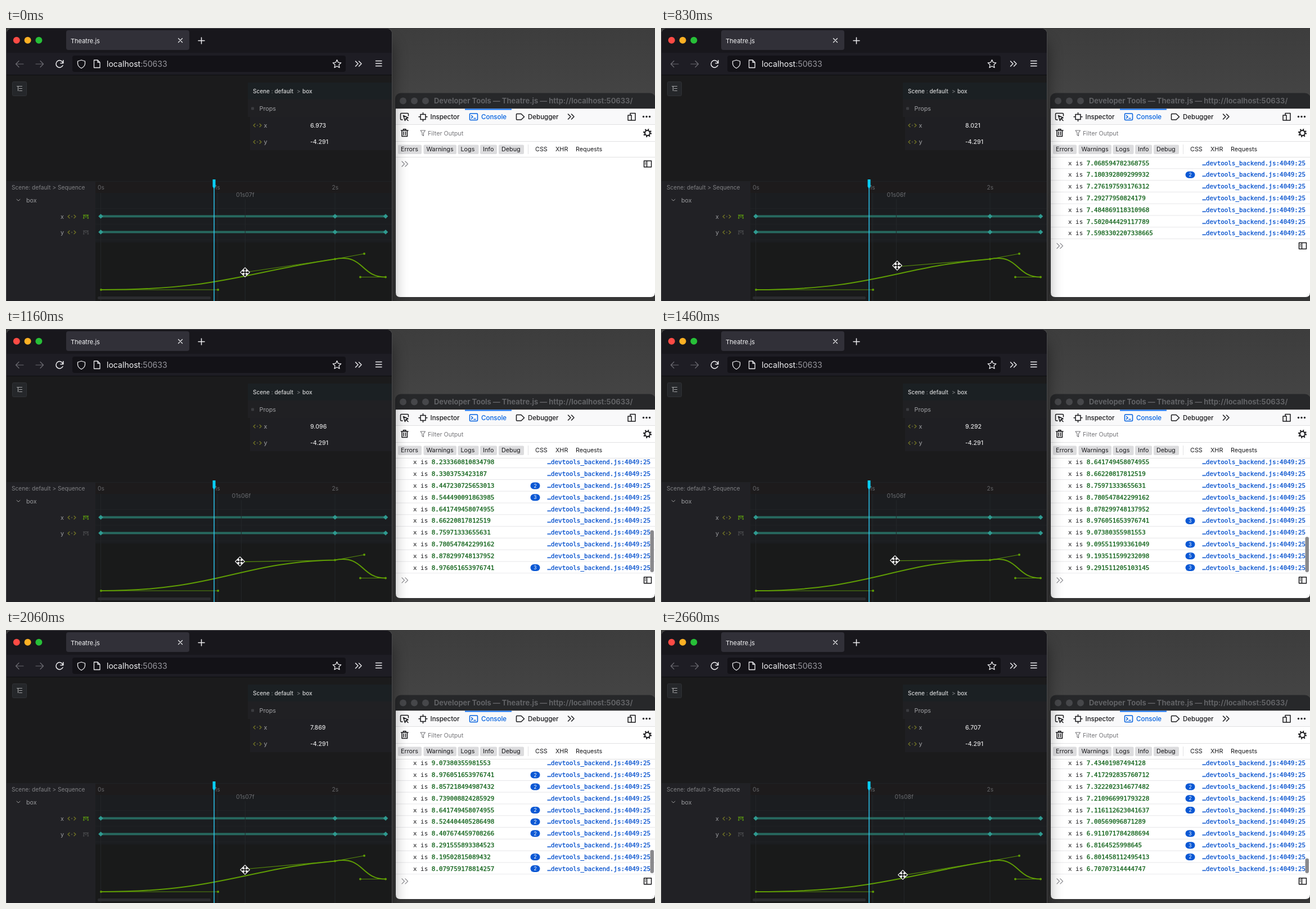
These frames come from a looping animation (1154 by 485 pixels, 2760 ms). An HTML page:

```html
<!DOCTYPE html>
<html lang="en">
<head>
<meta charset="utf-8">
<title>Sequence editor and console</title>
<style>
  html, body { margin: 0; width: 100%; height: 100%; overflow: hidden; background: #3e3e3e; }
  svg { display: block; font: 10.8px Inter, "Liberation Sans", sans-serif; }
  .mono { font: 10.9px "DejaVu Sans Mono", "Liberation Mono", monospace; white-space: pre; }
  .number { fill: #11631a; stroke: #11631a; stroke-width: .35; }
  .link { fill: #0b55cf; stroke: #0b55cf; stroke-width: .35; text-anchor: end; }
  .mid { text-anchor: middle; }
  .line { fill: none; stroke-linecap: round; stroke-linejoin: round; }
</style>
</head>
<body>
<svg id="stage" width="1154" height="485" viewBox="0 0 1154 485">
  <defs>
    <linearGradient id="desk" x2="0" y2="1">
      <stop stop-color="#3d3d3d"/><stop offset=".25" stop-color="#444"/><stop offset="1" stop-color="#363636"/>
    </linearGradient>
    <filter id="blur" x="-20%" y="-20%" width="140%" height="140%"><feGaussianBlur stdDeviation="14"/></filter>
    <clipPath id="output"><rect x="693" y="230" width="461" height="204.5"/></clipPath>
    <clipPath id="browser"><rect x="1" y="1" width="685" height="490" rx="9"/></clipPath>
    <clipPath id="beside"><rect x="687" width="467" height="485"/></clipPath>
    <g id="prop" class="line" stroke="#787a24" stroke-width="1.2">
      <path d="M-4-2.8-7 0-4 2.8M4-2.8 7 0 4 2.8"/><circle r="1.3" fill="#4a4b38" stroke="none"/>
    </g>
    <path id="curveIcon" class="line" stroke-width="1.3" d="M-4.5-2.5H-2M-1-2.5H1M2-2.5H4.500M-3-1.500-4 1.500M3-1.500 4 1.500M-4.500 3H-3M3 3H4.500M-1 .5H1"/>
    <path id="key" d="M-4.300 0 0-4.300 4.300 0 0 4.300Z" fill="#2f9a90"/>
    <path id="more" class="line" d="M-5.500-4.500-1 0-5.500 4.500M.5-4.500 5 0 .5 4.500"/>
  </defs>
  <rect width="1154" height="485" fill="url(#desk)"/>

  <!-- browser window -->
  <rect width="687" height="500" rx="10" fill="#4b4b4d"/>
  <g clip-path="url(#browser)">
    <rect width="687" height="485" fill="#1b1b1c"/>
    <rect width="687" height="44" fill="#18171c"/>
    <rect y="44" width="687" height="39" fill="#1e1d24"/>
    <path d="M0 83.500H687" stroke="#0d0d10"/>
  </g>
  <circle cx="18.800" cy="21.700" r="6" fill="#fe4b45"/>
  <circle cx="38.600" cy="21.700" r="6" fill="#fdb024"/>
  <circle cx="58.400" cy="21.700" r="6" fill="#27c038"/>
  <rect x="107" y="4" width="219" height="35" rx="4" fill="#313038"/>
  <text x="115" y="26.500" font-size="11" fill="#f4f4f6">Theatre.js</text>
  <g class="line" stroke="#f0f0f2" stroke-width="1.200">
    <path d="M306.500 18.500 313.500 25.500M313.500 18.500 306.500 25.500"/>
    <path d="M342 22.500H353M347.500 17V28" stroke-width="1.500"/>
    <path d="M31 64H17.500M23 58.500 17.500 64 23 69.500M53 64H66.500M61 58.500 66.500 64 61 69.500" stroke="#6b6a71"/>
    <path d="M101.300 62A6.300 6.300 0 1 0 101 66.500M101.800 57.500V62.500H97" stroke-width="1.500"/>
  </g>
  <rect x="118" y="49" width="486" height="29" rx="4" fill="#131217"/>
  <g class="line" stroke="#ededf0" stroke-width="1.300">
    <path d="M134 57 140.500 59V63.500Q140 68.500 134 71.500 128 68.500 127.500 63.500V59Z"/>
    <path d="M156.500 57H163L167 61V70.500H156.500ZM163 57V61H167"/>
    <path d="M588.500 56.500 590.700 61.200 595.800 61.800 592 65.300 593 70.400 588.500 67.800 584 70.400 585 65.300 581.200 61.800 586.300 61.200Z"/>
    <use href="#more" x="627" y="63.500" stroke-width="1.500"/>
    <path d="M657.500 58.500H668M657.500 63H668M657.500 67.500H668" stroke-width="1.500"/>
  </g>
  <text x="179" y="68.800" font-size="14.100" fill="#f2f2f4">localhost<tspan fill="#98979e">:50633</tspan></text>

  <!-- object panel -->
  <rect x="11.500" y="95.500" width="25" height="25" rx="2" fill="#25272a" stroke="#303236"/>
  <path class="line" d="M19.500 103.500H28.500M23.500 107.500H28.500M23.500 111.500H28.500M21.500 103.500V111.500" stroke="#a4a5a7" stroke-width="1.200"/>
  <rect x="430" y="97" width="256" height="30" fill="#1b2023"/>
  <rect x="434" y="127" width="252" height="90" fill="#1f1f23"/>
  <rect x="430" y="127" width="256" height="31" fill="#202023"/>
  <g font-weight="500" fill="#d4d5d6" font-size="10">
    <text x="439" y="116">Scene <tspan fill="#77797c">:</tspan> default</text>
    <text x="517" y="116" fill="#77797c">&gt;</text><text x="527" y="116">box</text>
  </g>
  <rect x="436" y="140.500" width="5" height="5" rx="1" fill="#3a3b3f"/>
  <text x="450.500" y="147" fill="#a0a1a4">Props</text>
  <use href="#prop" x="447" y="173"/><use href="#prop" x="447" y="202.500"/>
  <g fill="#a0a1a4"><text x="458.500" y="176.500">x</text><text x="458.500" y="206">y</text></g>
  <g font-weight="500" fill="#e0e0e1" font-size="10.500">
    <text id="xValue" x="541" y="176.500"></text><text x="541" y="206">-4.291</text>
  </g>

  <!-- sequence editor -->
  <rect x="1" y="272" width="158" height="213" fill="#212125"/>
  <rect x="159" y="272" width="527" height="21" fill="#1d1b1c"/>
  <rect x="159" y="293" width="527" height="88" fill="#1b1d20"/>
  <rect x="159" y="381" width="527" height="104" fill="#191a1a"/>
  <path d="M1 272.500H686M159 320.500H686M159 348.500H686M159 376.500H686" stroke="#202225"/>
  <path d="M168.500 293V485M376.500 293V485M585 293V485" stroke="#232629"/>
  <g fill="#808184" font-size="10.200">
    <text x="10" y="286.500">Scene: default &gt; Sequence</text>
    <g fill="#68696c"><text x="163" y="286.500">0s</text><text x="371" y="286.500">1s</text><text x="579.500" y="286.500">2s</text></g>
    <g font-size="10.700" fill="#9a9b9e">
      <text x="36" y="310">box</text><text x="97" y="338.500">x</text><text x="97" y="366.500">y</text>
    </g>
  </g>
  <path class="line" d="M19 304.300 22 307 25 304.300" stroke="#999"/>
  <use href="#prop" x="117" y="335"/><use href="#prop" x="117" y="363"/>
  <use href="#curveIcon" x="142" y="335" stroke="#5c9a10"/>
  <use href="#curveIcon" x="142" y="363" stroke="#4a4b4e"/>
  <path d="M168.500 334.500H675M168.500 362.500H675" stroke="#27695f" stroke-width="4"/>
  <g id="keys"></g>
  <path id="guide" stroke="#25282b"/>
  <text id="stamp" class="mid" y="300" font-size="10.500" fill="#6a6b6e"></text>
  <path id="handle" class="line" stroke="#568a0c" stroke-width="1.100"/>
  <path id="curve" class="line" stroke="#5f9d04" stroke-width="2"/>
  <g id="dots" fill="#5f9d04"></g>
  <rect x="163" y="477" width="201" height="5" rx="2" fill="#2b2c2f"/>
  <path d="M370 280V485" stroke="#2cc6ee" stroke-width="1.500"/>
  <path d="M367.500 269H372.500V281.500L370.700 285H369.300L367.500 281.500Z" fill="#08d0f8"/>
  <g id="cursor">
    <path d="M0-8.500 8.500 0 0 8.500-8.500 0Z" fill="#fff" stroke="#fff" stroke-linejoin="round"/>
    <path d="M-5 0H5M0-5V5" stroke="#000" stroke-width="1.500"/>
    <path d="M0-7.500 2.600-4.300H-2.600ZM0 7.500 2.600 4.300H-2.600ZM-7.500 0-4.300-2.600V2.600ZM7.500 0 4.300-2.600V2.600Z"/>
  </g>

  <!-- developer tools window -->
  <rect x="692" y="115.500" width="463" height="363" rx="10" fill="#27282a"/>
  <path d="M693 143.500H1154V470Q1154 478 1146 478H701Q693 478 693 470Z" fill="#fff"/>
  <rect x="693" y="143.500" width="461" height="28" fill="#f9f9fa"/>
  <g fill="#46474a"><circle cx="706" cy="129.500" r="6"/><circle cx="726" cy="129.500" r="6"/><circle cx="746" cy="129.500" r="6"/></g>
  <text x="761" y="133.700" font-size="12.930" font-weight="700" fill="#616265">Developer Tools — Theatre.js — http://localhost:50633/</text>
  <path d="M693 171.500H1154M693 201.500H1154M693 229.500H1154M928.500 207V224" stroke="#e0e0e2"/>
  <rect x="816" y="143.500" width="83" height="2" fill="#0a6cf0"/>
  <g font-size="11.500" font-weight="500" fill="#18181b">
    <text x="754.500" y="161.700">Inspector</text>
    <text x="845" y="161.700" fill="#0060df">Console</text>
    <text x="928" y="161.700">Debugger</text>
  </g>
  <g class="line" stroke="#18181b" stroke-width="1.500">
    <path d="M705 163H703Q701.500 163 701.500 161.500V153Q701.500 151.500 703 151.500H714Q715.500 151.500 715.500 153V156M706.500 155.500 715 159.500 711 161 709.500 164.500ZM712 161.500 715 164.500"/>
    <path d="M737 153.500H746V162.500H737ZM734 157.800H737M746 157.800H749M741.500 150.500V153.500M741.500 162.500V165.500"/>
    <path d="M826 152H837Q838.500 152 838.500 153.500V162Q838.500 163.500 837 163.500H826Q824.500 163.500 824.500 162V153.500Q824.500 152 826 152ZM827.500 155.500 830 157.800 827.500 160.200M832 160.500H835" stroke="#0060df"/>
    <path d="M908.500 152.500H916L921.500 157.700 916 163H908.500Q907.500 163 907.500 162V153.500Q907.500 152.500 908.500 152.500Z"/>
    <use href="#more" x="1005" y="157.500"/>
    <path d="M1110 154V151.500H1119V164H1113M1106 155H1112V164H1106Z"/>
    <path d="M702.500 182H715M706.500 181.500V179.800H711V181.500M704 182.500V192.500H713.500V182.500M707 184.500V190M710.500 184.500V190"/>
    <path d="M737 182H745.500L742.500 186V191.500L740 190V186Z" stroke="#77777b" stroke-width="1.100"/>
    <circle cx="1140.500" cy="186.500" r="4.500" stroke-width="2"/>
    <circle cx="1140.500" cy="186.500" r="6.300" stroke-width="2.600" stroke-dasharray="2 2.948" stroke-linecap="butt"/>
  </g>
  <g fill="#222226"><circle cx="1133.500" cy="157.500" r="1.700"/><circle cx="1139" cy="157.500" r="1.700"/><circle cx="1144.500" cy="157.500" r="1.700"/></g>
  <text x="750" y="190.500" fill="#76767a">Filter Output</text>
  <g id="filters" fill="#18181b"></g>
  <g clip-path="url(#output)"><g id="rows"></g></g>
  <g id="prompt">
    <use href="#more" x="709.500" class="line" stroke="#85858a" stroke-width="1.200"/>
    <path class="line" d="M1134.500-5.500H1147.500V5.500H1134.500ZM1139.500-5.500V5.500" stroke="#18181b" stroke-width="1.500"/>
    <path d="M1136-2.500H1138M1136 0H1138" stroke="#18181b"/>
  </g>
  <rect id="thumb" x="1145.500" width="6.500" rx="3.200" fill="#7c7c7f" fill-opacity=".9"/>

  <!-- shadow of the browser window -->
  <g clip-path="url(#beside)"><rect y="26" width="687" height="520" rx="10" opacity=".45" filter="url(#blur)"/></g>
</svg>
<script>
const $ = id => document.getElementById(id);
const LOOP = 2760, TICK = 100 / 3, ROW = 20.8, TOP = 229.5, FLOOR = 434.3;
const START = 6.973;

// logged values, "*n" marks how often a value repeats
const logs = `7.068594782368755 7.180392809299932*2 7.276197593176312 7.29277950824179
7.484869118310968 7.502044429117789 7.5983302207338665 7.694616012349944 7.711814376021785
7.808293145672918*2 7.904771915324051 7.924038217745629 8.020712846203517*2 8.136346279350896
8.233360810834798 8.3303753423187 8.447230725653013*2 8.544490091863985*3 8.641749458074955
8.66220817812519 8.75971333655631 8.780547842299162 8.878299748137952 8.976051653976741*3
9.07380355981553 9.095511993361049*3 9.193511599232098*5 9.291511205103145*3 9.193511599232098*4
9.095511993361049*2 9.07380355981553 8.976051653976741*2 8.857218494987432*2 8.739008824285929
8.641749458074955*2 8.524404405286498*2 8.407674459708266*2 8.291555893384523 8.19502815089432*2
8.079759178814257*2 7.965093218467352*2 7.868624371920846 7.8510262964346 7.755221512558219*2
7.641989156719348*2 7.546423427660917 7.529347516232082*2 7.43401987494128 7.417292835760712
7.322202314677482*2 7.210966991793228*2 7.116112623041637*2 7.00569096871289 6.911071784288694*3
6.8164525998645*3 6.801458112495413*2 6.70707314444747`
  .split(/\s+/).map(s => s.split("*")).map(([text, n]) => ({ text, count: +n || 1 }));

// [tick, value, ...] tracks
const SHOWN = [17, 0, 25, 7, 35, 24, 44, 28, 48, 28, 55, 29, 62, 40, 73, 51.5, 78, 56, 79, 56, 80, 57];
const LATEST = [16, -1, 25, 12, 35, 25, 44, 27, 47, 27, 55, 34, 62, 41, 73, 54, 78, 56];
const MOUSE_X = [16, 425, 25, 420, 35, 416, 47, 416, 55, 420, 62, 425, 73, 430];
const MOUSE_Y = [16, 434, 25, 422, 35, 413, 44, 411, 47, 411, 55, 419, 62, 426, 73, 435];

function at(track, k) {
  if (k <= track[0]) return track[1];
  for (let i = 2; i < track.length; i += 2) {
    if (k <= track[i]) {
      const [k0, v0, k1, v1] = track.slice(i - 2, i + 2);
      return v0 + (v1 - v0) * (k - k0) / (k1 - k0);
    }
  }
  return track.at(-1);
}

function rowMarkup({ text }, count, y) {
  const badge = count < 2 ? "" :
    `<rect x="932.5" y="${y + 4.5}" width="17" height="12" rx="6" fill="#0b58d4"/>
     <text class="mid" x="941" y="${y + 13.6}" font-size="8.5" fill="#fff">${count}</text>`;
  return `<path d="M693 ${y + ROW - .5}H1154" stroke="#e6e6e8"/>
    <text class="mono" x="724" y="${y + 14}" fill="#18181b">x is <tspan class="number">${text}</tspan></text>${badge}
    <text class="mono link" x="1146" y="${y + 14}">…devtools_backend.js:4049:25</text>`;
}

function drawConsole(k) {
  const shown = at(SHOWN, k), n = Math.ceil(shown);
  const bottom = Math.min(TOP + ROW * n, FLOOR);
  let markup = "";
  for (let i = Math.max(0, n - 10); i < n; i++) {
    const part = Math.min(1, shown - i);
    markup += rowMarkup(logs[i], Math.ceil(part * logs[i].count), bottom - ROW * (n - i));
  }
  $("rows").innerHTML = markup;
  $("prompt").setAttribute("transform", `translate(0 ${bottom + 12})`);
  const size = n < 10 ? 0 : 2000 / n - 8.8;
  $("thumb").setAttribute("height", size);
  $("thumb").setAttribute("y", 432 - size);
}

function drawEditor(k) {
  const x = Math.round(at(MOUSE_X, k)), y = Math.round(at(MOUSE_Y, k));
  const latest = Math.round(at(LATEST, k));
  const value = latest < 0 ? START : +logs[latest].text;
  // handle height that gives the curve this value at the playhead
  const hy = 434 - (value - START - .0175 * (425 - x)) / .0965;
  $("xValue").textContent = value.toFixed(3);
  const frame = Math.round((x - 168.5) / 6.94), gx = 168.5 + frame * 6.94;
  $("stamp").textContent = `01s0${frame - 30}f`;
  $("stamp").setAttribute("x", gx);
  $("guide").setAttribute("d", `M${gx} 304V485`);
  $("handle").setAttribute("d", `M169 465H377M${x} ${hy}L585 410.5 637 401M630 442.500H675`);
  $("curve").setAttribute("d", `M169 465C377 465 ${x} ${hy} 585 410.5C637 401 630 442.500 675 442.500`);
  $("cursor").setAttribute("transform", `translate(${x} ${y})`);
}

$("keys").innerHTML = [334.5, 362.5].map(y =>
  [168.5, 585, 675].map(x => `<use href="#key" x="${x}" y="${y}"/>`).join("")).join("");
$("dots").innerHTML = [[169, 465], [377, 465], [585, 410.5], [637, 401], [630, 442.5], [675, 442.5]]
  .map(([x, y]) => `<circle cx="${x}" cy="${y}" r="2"/>`).join("");
$("filters").innerHTML = [["Errors", 697, 42], ["Warnings", 742.5, 58.5], ["Logs", 803.5, 37], ["Info", 843, 30],
  ["Debug", 876, 45], ["CSS", 936, 0], ["XHR", 972, 0], ["Requests", 1008, 0]]
  .map(([name, x, w]) => `<rect x="${x}" y="207.5" width="${w}" height="16.500" rx="2" fill="#dcdcde"/>
    <text x="${x + 5}" y="219.3">${name}</text>`).join("");

let last = -1;
function draw() {
  const k = Math.floor((performance.now() % LOOP + 8) / TICK);
  if (k !== last) {
    drawEditor(k);
    drawConsole(k);
    last = k;
  }
  requestAnimationFrame(draw);
}
draw();
</script>
</body>
</html>
```
